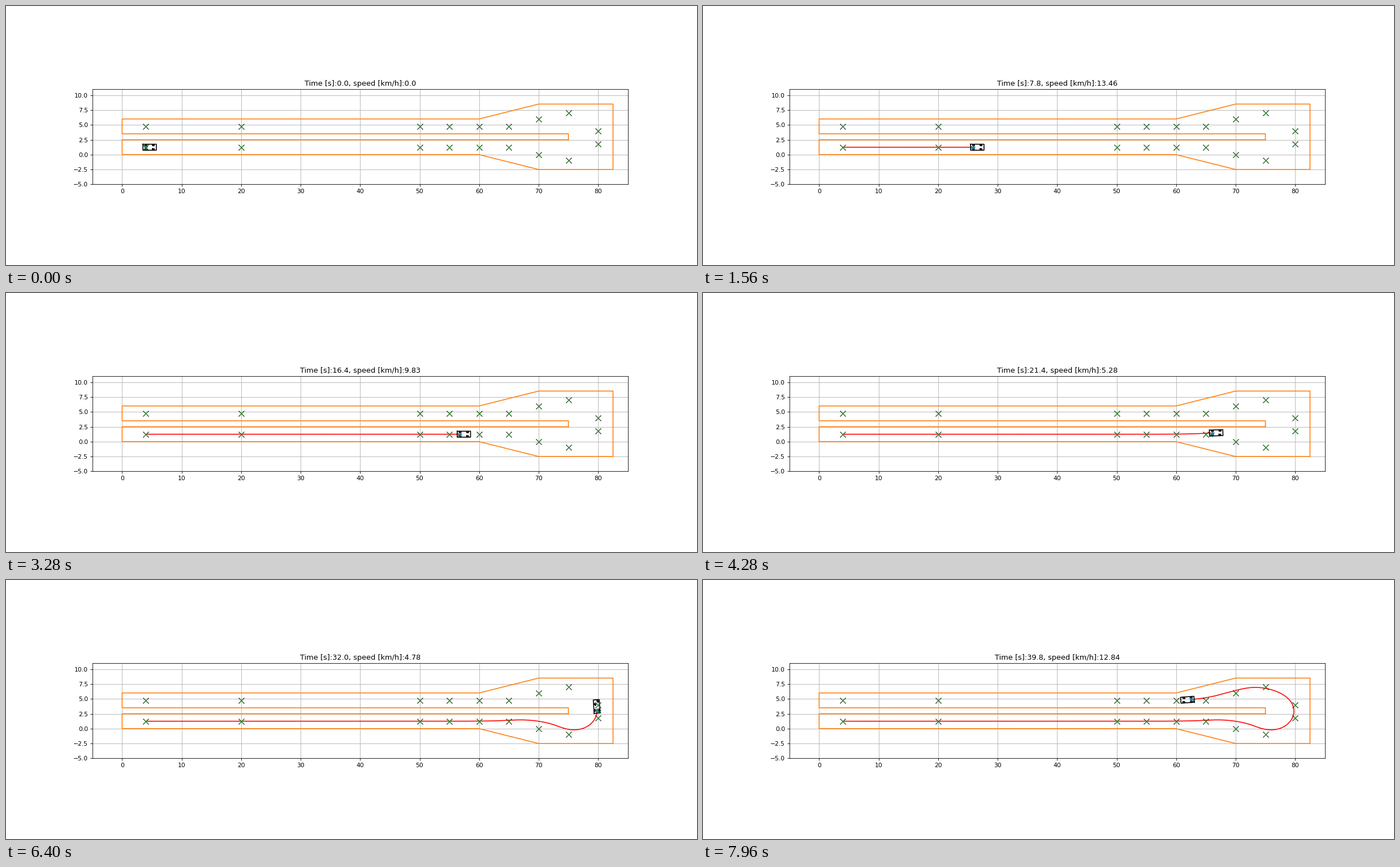
Write a matplotlib script that moves like this. It is 1222 px wide and 458 px high and loops after 8000 ms.

```python
import numpy as np
import matplotlib.pyplot as plt
from matplotlib.animation import FuncAnimation

FRAMES, INTERVAL, DT = 200, 40, 0.2
STAGE, DPI = np.array([1222, 458]), 77

# Car geometry in metres
LENGTH, WIDTH, BACK = 2.25, 1.0, 0.5
WHEEL_LEN, WHEEL_WIDTH, TREAD, AXLE = 0.15, 0.1, 0.35, 1.25
STEER_BASE, MAX_STEER = 2.5, np.radians(45)
MID_Y = 3


def mirror(pts):
    """Reflect across the road's centre line, in reverse order."""
    return [(x, 2 * MID_Y - y) for x, y in reversed(pts)]


def arc(cx, rx, ry, degrees):
    a = np.radians(degrees)
    return list(zip(cx + rx * np.cos(a), MID_Y + ry * np.sin(a)))


LOWER_EDGE = [(75, 2.5), (0, 2.5), (0, 0), (60, 0), (70, -2.5), (82.5, -2.5)]
BORDER = np.array(LOWER_EDGE + mirror(LOWER_EDGE) + LOWER_EDGE[:1])

OUTWARD = [(x, 1.25) for x in (4, 20, 50, 55, 60, 65)] + [(70, 0), (75, -1)]
WAYPOINTS = np.array(OUTWARD + [(80, 1.75), (80, 4)] + mirror(OUTWARD))

# Driven line: straight, swerve, two quarter ellipses, way back
DRIVEN = np.array(
    [(4, 1.25), (30, 1.25), (52, 1.25), (60, 1.27), (64, 1.36), (67.3, 1.47),
     (70, 1.24), (72.5, 0.67), (74.4, 0.02)]
    + arc(76, 3.8, 3.2, np.arange(-90, 1, 22.5))
    + arc(73.1, 6.7, 3.93, np.arange(22.5, 91, 22.5))
    + [(70, 6.42), (66.5, 5.5), (62.85, 4.93), (60, 4.78)])

# Seconds, km/h: speed up, cruise, slow for the turn, speed up again
SPEED_KEYS = [(0, 0), (3.9, 13.54), (11, 13.4), (14, 13.4), (16.4, 9.83),
              (18.6, 6.12), (24, 4.5), (26.2, 5.73), (29.4, 5.94),
              (32, 4.78), (35, 4.97), (37.3, 13.6), (39.8, 12.84)]


def spline(pts, step=0.02):
    """Natural cubic spline through pts, sampled along its chord length."""
    h = np.hypot(*np.diff(pts, axis=0).T)
    knots = np.concatenate([[0], np.cumsum(h)])
    n = len(pts)
    a, b = np.eye(n), np.zeros((n, 2))
    slope = np.diff(pts, axis=0) / h[:, None]
    for i in range(1, n - 1):
        a[i, i - 1:i + 2] = h[i - 1], 2 * (h[i - 1] + h[i]), h[i]
        b[i] = 6 * (slope[i] - slope[i - 1])
    m = np.linalg.solve(a, b)
    u = np.arange(0, knots[-1], step)
    k = np.clip(np.searchsorted(knots, u, side="right") - 1, 0, n - 2)
    d, hk = (u - knots[k])[:, None], h[k][:, None]
    return (pts[k] + d * (slope[k] - hk * (2 * m[k] + m[k + 1]) / 6)
            + d ** 2 * m[k] / 2 + d ** 3 * (m[k + 1] - m[k]) / (6 * hk))


def rotate(shape, angle):
    c, s = np.cos(angle), np.sin(angle)
    return shape @ np.array([[c, s], [-s, c]])


def rect(x0, x1, y0, y1):
    return np.array([(x0, y1), (x1, y1), (x1, y0), (x0, y0), (x0, y1)])


BODY = rect(-BACK, LENGTH - BACK, -WIDTH / 2, WIDTH / 2)
WHEELS = [rect(-WHEEL_LEN, WHEEL_LEN, y - WHEEL_WIDTH, y + WHEEL_WIDTH)
          for y in (-TREAD, TREAD)]


def car_parts(pos, yaw, steer):
    front = [rotate(w, steer) + (AXLE, 0) for w in WHEELS]
    return [rotate(p, yaw) + pos for p in [BODY, *front, *WHEELS]]


# Driven path by arc length
path = spline(DRIVEN)
dist = np.concatenate([[0], np.cumsum(np.hypot(*np.diff(path, axis=0).T))])
heading = np.unwrap(np.arctan2(*np.gradient(path, axis=0).T[::-1]))
bend = np.gradient(heading, dist)


def along(s):
    return np.stack([np.interp(s, dist, axis) for axis in path.T], axis=-1)


# State at every frame
times = np.arange(FRAMES) * DT
speed = np.interp(times, *zip(*SPEED_KEYS))
travel = np.concatenate(
    [[0], np.cumsum((speed[1:] + speed[:-1]) / 2 / 3.6 * DT)])
places = along(travel)
yaws = np.interp(travel, dist, heading)
steers = np.clip(np.arctan(STEER_BASE * np.interp(travel, dist, bend)),
                 -MAX_STEER, MAX_STEER)

# Reference point: nearest on the course, slightly behind the car
course = spline(WAYPOINTS, 0.1)
targets = np.array([course[np.argmin(np.hypot(*(course - p).T))]
                    for p in along(np.maximum(travel - 0.25, 0))])

# The tiny margin keeps the pixel size from rounding down
fig, ax = plt.subplots(figsize=(STAGE + 1e-6) / DPI, dpi=DPI)
ax.set_xlim(-5, 85)
ax.set_ylim(-5, 11)
ax.set_yticks(np.arange(-5, 11, 2.5))
ax.set_aspect("equal")
ax.grid(True)

trail, = ax.plot([], [], "-r")
target, = ax.plot([], [], "xg")
car = [ax.plot([], [], "-k")[0] for _ in range(5)]
star, = ax.plot([], [], "*", color="C0")
ax.plot(*BORDER.T, color="C1")
ax.plot(*WAYPOINTS.T, "xk", markersize=10)
ax.plot(*WAYPOINTS.T, "x", color="C2")
title = ax.set_title("")


def draw(i):
    trail.set_data(*places[:i + 1].T)
    target.set_data(*targets[i:i + 1].T)
    star.set_data(*places[i:i + 1].T)
    for line, part in zip(car, car_parts(places[i], yaws[i], steers[i])):
        line.set_data(*part.T)
    title.set_text(f"Time [s]:{round(float(times[i]), 2)}, "
                   f"speed [km/h]:{round(float(speed[i]), 2)}")
    return [trail, target, star, *car, title]


anim = FuncAnimation(fig, draw, frames=FRAMES, interval=INTERVAL,
                     init_func=lambda: draw(0), repeat=True, repeat_delay=0)
plt.show()
```
